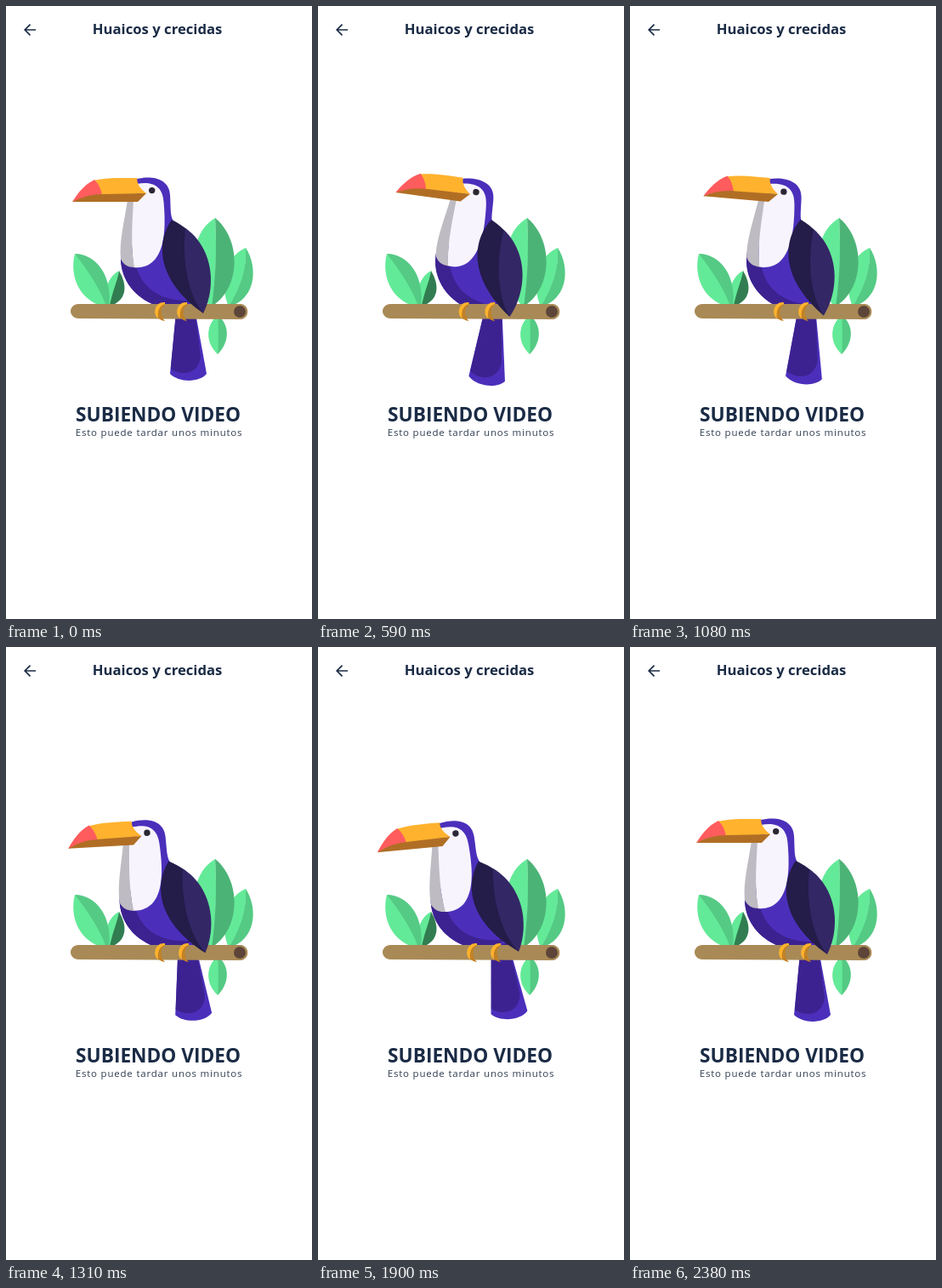
An HTML page with a canvas for the animation above (2410 ms loop, 360 by 720 pixels).

```html
<!DOCTYPE html>
<html lang="es">
<head>
<meta charset="utf-8">
<title>Subiendo video</title>
<style>
  html, body { margin: 0; width: 100%; height: 100%; overflow: hidden; background: #fff; }
  canvas, svg { position: absolute; left: 0; top: 0; width: 360px; height: 720px; }
  text { font-family: "Open Sans", "Noto Sans", sans-serif; fill: #1a2b45; }
  .title { font-size: 16.7px; font-weight: 700; }
  .status { font-size: 22.7px; font-weight: 700; }
  .hint { font-size: 11.5px; letter-spacing: .8px; fill: #303e53; }
</style>
</head>
<body>
<canvas id="stage" width="360" height="720"></canvas>
<svg viewBox="0 0 360 720">
  <path d="M35 28H22.5M28.5 21.7L22.2 28l6.3 6.3" fill="none" stroke="#1a2b45" stroke-width="1.7"/>
  <text class="title" x="101.8" y="33">Huaicos y crecidas</text>
  <text class="status" x="82" y="488">SUBIENDO VIDEO</text>
  <text class="hint" x="81.7" y="505">Esto puede tardar unos minutos</text>
</svg>
<script>
const canvas = document.getElementById('stage');
const ctx = canvas.getContext('2d');
const ratio = window.devicePixelRatio || 1;
canvas.width = 360 * ratio;
canvas.height = 720 * ratio;

const LOOP = 2410;
const LIGHT = '#63ea98', MID = '#54ca84', DEEP = '#4cb376', FOREST = '#317d51';
const VIOLET = '#4b2fbb', INDIGO = '#3c2290', YELLOW = '#ffb22d', BROWN = '#b06e25';

const shape = (color, d) => ({ color, path: new Path2D(d) });

const leaves = [
  shape(LIGHT, 'M133 311C121 317 113 335 120 352L124 352C128 340 133 327 133 311Z'),
  shape(FOREST, 'M133 311C143 328 143 345 122 353C124 338 131 324 133 311Z'),
  shape(LIGHT, 'M81 291C74 318 87 349 120 354C113 329 98 305 81 291Z'),
  shape(MID, 'M81 291C106 291 126 317 121 354L118 353C111 332 97 312 81 291Z'),
  shape(LIGHT, 'M282 284C257 295 251 328 262 353C277 330 283 310 282 284Z'),
  shape(MID, 'M282 284C297 307 294 345 262 353C276 330 283 310 282 284Z'),
  shape(LIGHT, 'M246 249C214 268 214 320 240 353H244C247 320 248 280 246 249Z'),
  shape(DEEP, 'M246 249C276 273 278 330 242 353C247 320 248 280 246 249Z'),
  shape(LIGHT, 'M249 363C234 376 235 396 249 409C251 395 251 379 249 363Z'),
  shape(MID, 'M249 363C263 374 264 394 249 409C250 395 250 379 249 363Z')
];

const branch = [
  shape('#a98a56', 'M85 350H276C287 351 287 367 276 368L85 367C73 366 73 351 85 350Z'),
  shape('#5e4539', 'M282 359A7 7 0 1 1 268 359A7 7 0 1 1 282 359Z')
];

const body = [
  // tail
  shape(VIOLET, 'M201 350L193 432C204 443 228 442 236 432L221 350Z'),
  shape(INDIGO, 'M201 350L193.8 426C207 435 227 433 229 411L221 350Z'),
  // torso
  shape(VIOLET, 'M154 203C171 199 192 202 193 222C194 240 193 245 197 253L225 346' +
    'C215 356 188 355 172 350C148 339 134 318 135 292L150 245Z'),
  shape(INDIGO, 'M135 294C134 318 148 339 172 350C188 355 210 355 216 346C178 347 159 328 153 305Z'),
  // neck and face
  shape('#f7f4fd', 'M154 209C171 206 184 210 185.5 230C188 258 187 284 175 298C168 306 158 308 150 307L144 228L160 222Z'),
  shape('#bebbc2', 'M143 228C139 254 133 277 135 297C138 304 144 307 151 307C146 280 149 250 150 228Z'),
  // beak
  shape(YELLOW, 'M103 205C119 201 138 202 154 202Q154 212 165 220L112 223Z'),
  shape('#ff5c5d', 'M78 230C85 219 92 210 104 204Q111 211 113 222L95 227Z'),
  shape(BROWN, 'M78 230C90 224 101 221 115 221L165 220L155 230Z'),
  shape('#2c2634', 'M175.4 216.6A3.7 3.7 0 1 1 168 216.6A3.7 3.7 0 1 1 175.4 216.6Z')
];

const wing = [
  shape('#241c49', 'M195 251C176 278 177 322 232 361L215 264C209 259 203 255 195 251Z'),
  shape('#342766', 'M211 261C229 273 241 296 241 322C241 338 237 351 232 361C214 339 207 299 211 261Z')
];

const foot = [
  shape('#c28125', 'M11 349C-3 349 -4 368 11 370C5 365 5 354 11 351Z'),
  shape(YELLOW, 'M11 348C-1 347 -4 362 3 367C2 358 4 352 11 350Z')
];

function draw(shapes) {
  for (const { color, path } of shapes) {
    ctx.fillStyle = color;
    ctx.fill(path);
  }
}

function drawTurned(shapes, x, y, degrees, drop = 0) {
  ctx.save();
  ctx.translate(x, y + drop);
  ctx.rotate(degrees * Math.PI / 180);
  ctx.translate(-x, -y);
  draw(shapes);
  ctx.restore();
}

function drawFoot(x) {
  ctx.save();
  ctx.translate(x, 0);
  draw(foot);
  ctx.restore();
}

const ease = p => p < .5 ? 2 * p * p : 1 - 2 * (1 - p) ** 2;

// The bird leans back, then forward, then returns upright.
const leans = [0, 9.2, -7.6, 0];
function leanAt(time) {
  const phase = Math.min(time / 800, 2.9999);
  const i = Math.floor(phase);
  return leans[i] + (leans[i + 1] - leans[i]) * ease(phase - i);
}

function render(now) {
  const lean = leanAt(now % LOOP);
  const drop = 1.6 * (1 - Math.exp(-Math.abs(lean) / 2));
  ctx.setTransform(ratio, 0, 0, ratio, 0, 0);
  ctx.fillStyle = '#fff';
  ctx.fillRect(0, 0, 360, 720);
  draw(leaves);
  drawTurned(body, 176, 320, lean, drop);
  draw(branch);
  drawTurned(wing, 200, 316, lean);
  drawFoot(176 - 1.2 * Math.max(0, lean));
  drawFoot(202 + Math.min(2, -.6 * lean));
}

let start;
function tick(now) {
  start ??= now;
  render(now - start);
  requestAnimationFrame(tick);
}
render(0);
requestAnimationFrame(tick);
</script>
</body>
</html>
```
